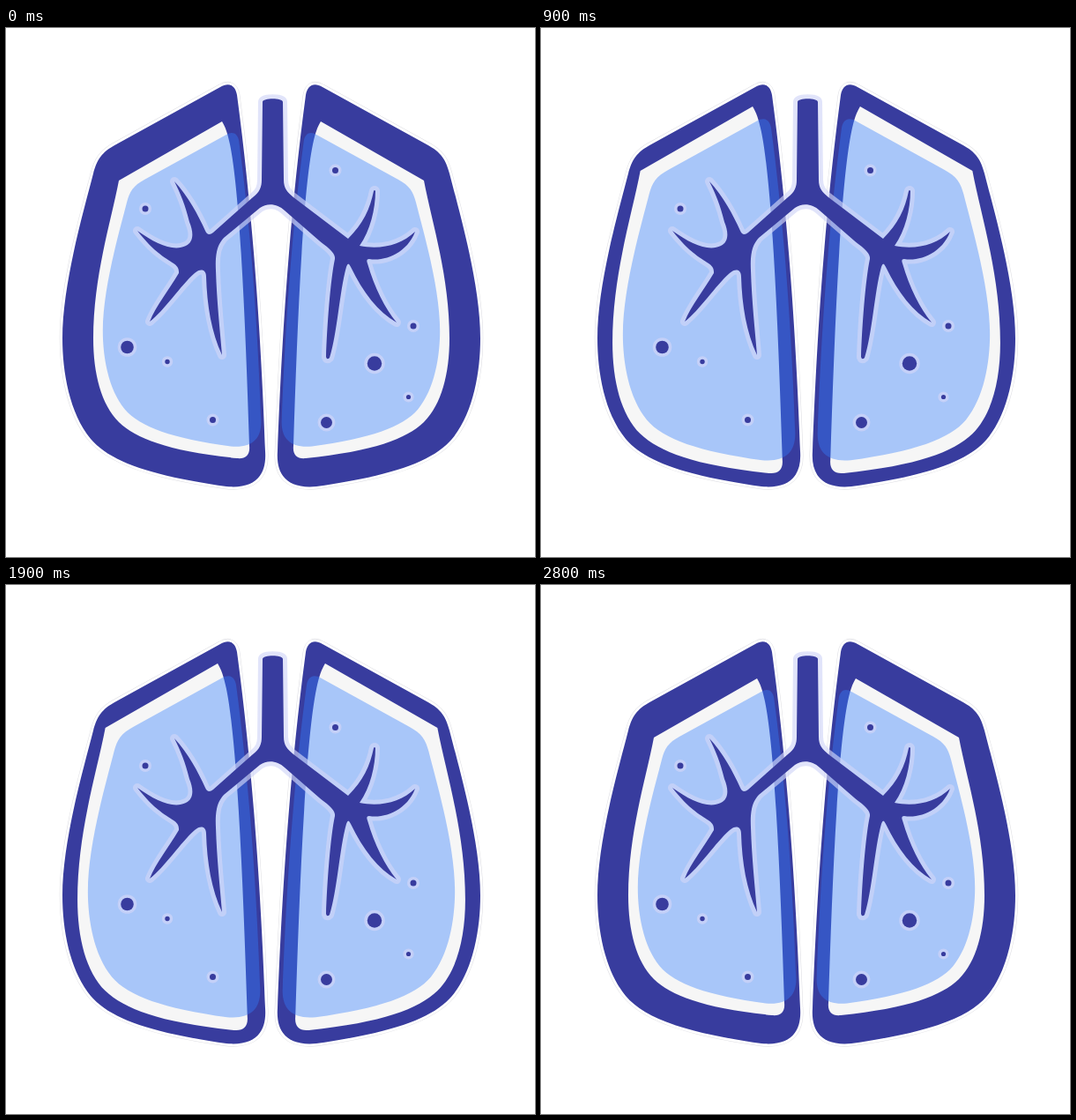
Animation, 600 px wide and 600 px high, one loop 2900 ms. Source, as an HTML page:

```html
<!DOCTYPE html>
<html lang="en">
<head>
<meta charset="utf-8">
<title>Breathing lungs</title>
<style>
  html, body { margin: 0; width: 100%; height: 100%; overflow: hidden; background: #fff; }
  svg { display: block; width: 100%; height: 100%; }
  .halo { stroke: rgba(210, 214, 248, .65); stroke-linejoin: round; paint-order: stroke; }
</style>
</head>
<body>
<svg viewBox="0 0 600 600">
  <defs>
    <path id="lobe" d="M262 76C260 65 253 61 243 67L125 132C108 141 103 150 99 165
      C88 208 64 290 64 352C64 390 72 437 96 466C118 492 165 508 250 520
      C282 523 296 508 294 480C291 400 284 240 262 76Z"/>
    <g id="shell">
      <use href="#lobe" fill="none" stroke="#dedee2" stroke-width="6.6"/>
      <use href="#lobe" fill="#383c9e" stroke="#fff" stroke-width="5.6" style="paint-order:stroke"/>
    </g>
    <g id="air">
      <path fill="#f6f6f6" d="M245 106L128 173C119 220 99 282 99 352C99 392 108 427 128 447
        C148 466 185 480 262 488C272 489 277 484 276 474C272 350 266 190 254 132C251 118 249 113 245 106Z"/>
      <use href="#lobe" fill="#337efd" fill-opacity=".4" transform="translate(59.9 68.9) scale(.78)"/>
    </g>
  </defs>

  <use href="#shell"/>
  <use href="#shell" transform="translate(602) scale(-1 1)"/>
  <g id="breath">
    <use href="#air"/>
    <use href="#air" transform="translate(602) scale(-1 1)"/>
  </g>

  <g class="halo" fill="#383c9e">
    <path stroke-width="10" d="M291 84C291 79 314 79 314 84L315 172C315 182 319 186 326 192L388 239
      C405 222 413 205 417 185Q418 183 419 185C419 205 413 230 401 247C425 252 448 246 464 231
      C455 255 430 265 412 262Q408 262 410 267C418 295 430 318 443 334C422 322 405 300 391 271
      Q388 264 386 271C378 300 376 345 367 374Q364 377 363 373C364 340 368 285 373 262
      C374 254 362 247 355 241L316 207C308 199 296 198 288 204L247 238C240 246 237 255 238 275
      C239 310 243 345 245 371C233 345 228 315 227 282C227 274 221 272 214 278
      C198 292 180 320 163 333C170 315 185 297 196 278C197 263 180 270 149 230
      C170 245 190 254 204 247C213 243 213 232 208 220C203 200 198 188 191 174
      C206 190 218 212 226 230Q229 237 235 232L280 192C288 186 290 180 290 172Z"/>
    <g id="dots" stroke-width="7"></g>
  </g>
</svg>
<script>
  const STEP = 100, FRAMES = 29, PEAK = 14, GROWTH = 0.138;
  const breath = document.getElementById('breath');

  document.getElementById('dots').innerHTML = [
    [158, 205, 3.5], [137.5, 362, 7.3], [183, 378.5, 2.7], [234.5, 444.5, 3.5],
    [373.5, 161.5, 3.5], [418, 380.5, 8.2], [462, 338, 3.5], [456.5, 418.5, 2.6], [363.5, 447.5, 6.5],
  ].map(([x, y, r]) => `<circle cx="${x}" cy="${y}" r="${r}"/>`).join('');

  function draw() {
    const frame = Math.floor(performance.now() / STEP) % FRAMES;
    const scale = 1 + GROWTH * (1 - Math.abs(frame - PEAK) / PEAK);
    breath.setAttribute('transform', `translate(301 297) scale(${scale}) translate(-301 -297)`);
    requestAnimationFrame(draw);
  }
  draw();
</script>
</body>
</html>
```
